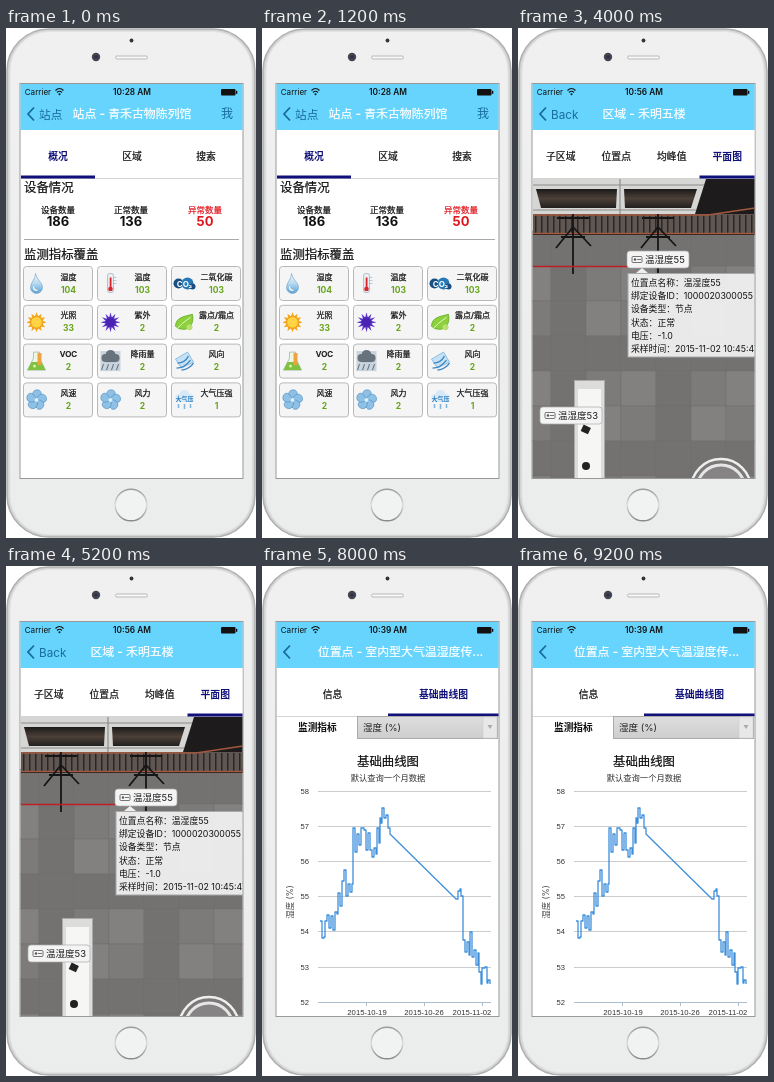
Write an HTML page that moves like this. It is 250x510 px and loops after 10000 ms.

```html
<!DOCTYPE html>
<html lang="zh-CN">
<head>
<meta charset="utf-8">
<style>
html, body { margin: 0; width: 100%; height: 100%; overflow: hidden; background: #fff }
svg { display: block; width: 250px; height: 510px }
text { font-family: Inter, "Noto Sans CJK SC", "Noto Sans CJK", sans-serif; fill: currentColor; white-space: pre }
.medium { font-weight: 500; stroke: currentColor; stroke-width: .22px }
.axis { font-family: "Liberation Sans", sans-serif }
</style>
</head>
<body>
<svg id="stage" viewBox="0 0 250 510"></svg>
<script>
const NAVY = '#10107a', INK = '#111', GREY = '#666', BLUE = '#4a9be8', SKY = '#67d4fd', LINK = '#176c9e', GREEN = '#65a31c';

const text = (x, y, s, size, fill = INK, anchor = 'middle', extra = '') =>
  `<text x="${x}" y="${y}" font-size="${size}" color="${fill}" text-anchor="${anchor}" ${extra}>${s}</text>`;
const rect = (x, y, w, h, fill, extra = '') =>
  `<rect x="${x}" y="${y}" width="${w}" height="${h}" fill="${fill}" ${extra}/>`;
const path = (d, stroke, width = 1, fill = 'none', extra = '') =>
  `<path d="${d}" stroke="${stroke}" stroke-width="${width}" fill="${fill}" ${extra}/>`;
const shape = (d, fill) => path(d, 'none', 0, fill);
const circle = (x, y, r, fill, extra = '') => `<circle cx="${x}" cy="${y}" r="${r}" fill="${fill}" ${extra}/>`;
const at = (x, y, s) => `<g transform="translate(${x} ${y})">${s}</g>`;
const spin = (n, s) => Array.from({ length: n }, (_, i) => `<g transform="rotate(${i * 360 / n})">${s}</g>`).join('');
const BOLD = 'font-weight="700"', SEMI = 'font-weight="600"', MED = 'class="medium"', AXIS = 'class="axis"';

// Weather and sensor icons, centred on the origin
const cloud = (fill, y = 0) => at(0, y, circle(-5, 0, 4, fill) + circle(0, -3, 5, fill) + circle(5, 0, 4, fill) + rect(-5, 0, 10, 4, fill));
const fan = spin(5, path('M0 0C-6-3-5-11 2-10C7-8 4-3 0 0Z', '#4c8fc4', .6, '#8fc0e6')) + circle(0, 0, 2, '#d9edfb');
const icon = {
  drop: path('M-1-10C0-4 6-1 6 4A6 6 0 0 1-6 4C-6-1-1-4-1-10Z', '#7aa9cd', .7, 'url(#water)') + path('M-3 3Q-3 7 1 7', '#fff', 1.2),
  heat: rect(-3, -10, 6, 19, '#e9eef2', 'rx="2" stroke="#9ab" stroke-width=".7"') + rect(-.8, -6, 1.8, 10, '#d8232a') +
    circle(0, 5.5, 2.3, '#d8232a') + path('M3-6h3M3-3h3M3 0h3', '#9ab', .6),
  co2: circle(-6, 0, 5, '#174f80') + circle(3, 0, 6, '#2779b5') + circle(8, 3, 3, '#174f80') +
    text(0, 3, 'CO₂', 8, '#fff', 'middle', BOLD),
  sun: spin(12, shape('M-2-5L0-10L2-5Z', '#f2a51d')) + circle(0, 0, 5.8, '#ffd342', 'stroke="#ef9c18"'),
  uv: spin(12, shape('M-1.5-4L0-10L1.5-4Z', '#5a35c8')) + circle(0, 0, 5, '#4a22b4'),
  leaf: path('M-9 4C-9-5 0-6 8-8C10 1 5 8-2 7Q-6 7-9 4Z', '#58a51c', .7, '#8cd03c') + path('M-9 8Q-3 1 6-5', '#e4f7bd', 1) +
    circle(5, 5, 3, '#b7df72'),
  flask: path('M-3-9h6v6L9 9h-18L-3-3Z', '#9bbaa0', .8, '#eef6e8') + shape('M-5 1h10L9 9h-18Z', '#7fc243') +
    rect(1, -8, 4, 12, '#f0a23c') + circle(-2, 5, 1.5, '#d9f2a8'),
  rain: rect(-10, -10, 20, 20, '#c9d3db') + cloud('#68727c', -3) + path('M-7 3l-2 6M-2 3l-2 6M3 3l-2 6M8 3l-2 6', '#48627a', .9),
  wind: path('M-9-2L3-9L9 1L-3 7Z', '#6fa8d5', .7, '#c4e2f6') + path('M-8 7Q0 7 6-1M-7 2Q0 2 4-5M-3 9Q5 8 9 2', '#3e86c2', 1.3),
  fan,
  press: cloud('#d5e9f7', -2) + text(0, 1, '大气压', 6, '#2f7fbd', 'middle', BOLD) + path('M-6 4v4M0 4v5M6 4v4', '#7db6df', 1.6)
};

function card(x, y, name, label, value, small) {
  return rect(x, y, 69, 34, '#f5f5f5', 'rx="3" stroke="#b8b8b8"') + at(x + 13, y + 17, icon[name]) +
    text(x + 45, y + 13, label, 8, INK, 'middle', MED) +
    (small ? text(x + 45, y + 25, value, 7.6, INK, 'middle', SEMI) : text(x + 45, y + 26, value, 8.5, GREEN, 'middle', BOLD));
}

const rule = y => path(`M18 ${y}H233`, '#aaa');
const heading = (y, s) => text(18, y, s, 12.4, INK, 'start', MED);

function header(time, back, title) {
  return rect(14, 55, 223, 47, SKY) + text(18.7, 67, 'Carrier', 8.1, INK, 'start') +
    path('M49.5 62.5Q53.5 58.5 57.5 62.5M51 64.5Q53.5 62 56 64.5', INK, 1.1) + circle(53.5, 66.3, 1, INK) +
    text(126, 67, time, 8.3, INK, 'middle', SEMI) +
    rect(215, 61, 14.5, 6.5, INK, 'rx="1"') + rect(230, 62.8, 1.3, 3, INK) +
    path('M28 79.5L22 86L28 92.5', LINK, 1.8) + text(33, 90.5, back, 11.7, LINK, 'start') +
    text(back ? 126 : 138.5, 90, title, 11.9, '#fff', 'middle', MED);
}

function tabs(names, active) {
  const w = 222 / names.length;
  return path('M15 150.5H237', '#d4d4d4') + names.map((s, i) =>
    text(15 + w * (i + .5), 132, s, 9.8, i == active ? NAVY : INK, 'middle', i == active ? BOLD : MED)).join('') +
    rect(15 + w * active, 147.5, w, 3, NAVY);
}

function picker(y) {
  return text(36, y + 15, '监测指标', 9.7, INK, 'start', BOLD) + rect(95.5, y + .5, 140, 22, 'url(#button)', 'stroke="#aaa"') +
    text(101, y + 15, '湿度 (%)', 9.5, '#222', 'start') + rect(221, y + 1, 14, 21, '#e8e8e8', 'stroke="#ccc" stroke-width=".6"') +
    shape(`M225.5 ${y + 9}h5l-2.5 4Z`, '#aaa');
}

function axes(title, y, top, high, low, step, gap) {
  let s = text(126, y, title, 12.4, INK, 'middle', MED) + text(126, y + 15, '默认查询一个月数据', 8.3, '#333') +
    text(0, 0, '湿度 (%)', 8.4, '#444', 'middle', 'transform="translate(31 336) rotate(-90)"');
  for (let v = high, i = 0; v >= low; v -= step, i++) {
    const gy = Math.round(top + i * gap) + .5;
    s += path(`M56 ${gy}H229`, v == low ? '#aebdcc' : '#ccc') + text(47, gy + 2.5, v, 7.6, '#333', 'end', AXIS);
  }
  return s;
}

function overview() {
  const stat = (x, label, n, fill) => text(x, 184.5, label, 8.5, fill, 'middle', MED) + text(x, 198, n, 13, fill, 'middle', BOLD);
  const items = [['drop', '湿度', 104], ['heat', '温度', 103], ['co2', '二氧化碳', 103], ['sun', '光照', 33], ['uv', '紫外', 2],
    ['leaf', '露点/霜点', 2], ['flask', 'VOC', 2], ['rain', '降雨量', 2], ['wind', '风向', 2], ['fan', '风速', 2], ['fan', '风力', 2], ['press', '大气压强', 1]];
  return header('10:28 AM', '站点', '站点 - 青禾古物陈列馆') + text(221, 90, '我', 12, LINK) +
    tabs(['概况', '区域', '搜索'], 0) + heading(164, '设备情况') +
    stat(52, '设备数量', 186, INK) + stat(125, '正常数量', 136, INK) + stat(199, '异常数量', 50, '#e0161c') +
    rule(211.5) + heading(231, '监测指标覆盖') +
    items.map((a, i) => card(17.5 + i % 3 * 74, 238.5 + Math.floor(i / 3) * 38.8, ...a)).join('');
}

const areaTabs = i => tabs(['子区域', '位置点', '均峰值', '平面图'], i);

function peaks() {
  const xs = [58, 67, 75, 84, 92, 101, 109, 117, 193, 202, 210, 219, 227];
  const mean = [341, 332, 322, 317, 306, 303, 313, 300, 326, 348, 343, 347, 349];
  const high = [314, 299, 288, 276, 243, 242, 280, 252, 285, 306, 307, 312, 310];
  const low = [380, 371, 350, 345, 332, 331, 334, 323, 356, 403, 370, 376, 367];
  const join = ys => xs.map((x, i) => [x, ys[i]]);
  return header('10:29 AM', 'Back', '区域 - 第一展厅') + areaTabs(2) + picker(157) + axes('均峰值', 207, 232, 70, 30, 10, 52.8) +
    path('M106.5 443v7M164.5 443v7M223.5 443v7', '#aebdcc') +
    path('M' + [...join(high), ...join(low).reverse()].join('L') + 'Z', 'none', 0, '#7cb5ec', 'opacity=".32"') +
    path('M' + join(mean).join('L'), BLUE, 1.3) + join(mean).map(p => circle(...p, 2.7, BLUE)).join('');
}

function tag(x, y, s) {
  return rect(x, y, 62, 17, '#f4f4f4', 'rx="3" stroke="#aaa" stroke-width=".7"') +
    rect(x + 5, y + 5.5, 10, 6, 'none', 'rx="1" stroke="#555" stroke-width=".8"') + circle(x + 8, y + 8.5, 1.2, '#555') +
    path(`M${x + 10} ${y + 8.5}h4`, '#555', .8) + text(x + 18, y + 12.2, s, 9.5, '#222', 'start');
}

function plan() {
  let s = '';
  for (let r = 0; r < 8; r++) for (let c = 0; c < 7; c++)
    s += rect(15 + c * 35 - 17, 203 + r * 35, 35, 35, ['#747271', '#7c7b79', '#838180'][(r * 2 + c * 3 + r * c) % 3], 'stroke="#706f6e" stroke-width=".6"');
  // Railing behind the display case
  s += rect(15, 150, 222, 57, '#1d1b1b') + rect(15, 186, 222, 20, '#5f5651');
  for (let x = 17; x < 237; x += 6) s += rect(x, 187, 1.5, 19, '#2c2624');
  s += path('M15 187H190L237 180M15 205.5H237', '#a4583f', 1.6);
  s += shape('M15 151H188L177 186H15Z', '#d6d6d4') + path('M15 157H186M15 182H178M102 151V186', '#8d8d8b', 1.2) +
    shape('M18 161H99L98 180H23Z', 'url(#scene)') + shape('M106 161H179L173 180H107Z', 'url(#scene)');
  for (const x of [55, 140])
    s += path(`M${x - 16} 190H${x + 16}M${x} 186V246M${x} 199L${x - 17} 220M${x} 199L${x + 18} 218M${x - 12} 209H${x + 12}`, '#151515', 1.8);
  s += path('M15 238.5H111', '#bd2024', 1.4) + rect(56.5, 352.5, 30, 98, '#dcdcdb', 'stroke="#aaa"') + rect(60, 361, 23, 90, '#f6f6f5') +
    rect(64, 398, 8, 7, '#222', 'transform="rotate(25 68 401)"') + circle(68, 438, 4, '#222') +
    circle(203, 461, 30, '#7b7978', 'stroke="#eee" stroke-width="2.5"') + circle(203, 461, 24, '#858383', 'stroke="#e6e6e6" stroke-width="3"') +
    tag(109, 223, '温湿度55') + tag(22, 379, '温湿度53') +
    rect(110, 245.5, 130, 83.5, '#f1f1f1', 'opacity=".94" stroke="#aaa"') + shape('M118 245l6-5l6 5Z', '#eee');
  const info = ['位置点名称：温湿度55', '绑定设备ID：1000020300055', '设备类型：节点', '状态：正常', '电压：-1.0', '采样时间：2015-11-02 10:45:47'];
  s += info.map((line, i) => text(113, 258 + i * 13.2, line, 8.8, INK, 'start')).join('');
  return s + header('10:56 AM', 'Back', '区域 - 禾明五楼') + rect(15, 102, 222, 48, '#fff') + areaTabs(3);
}

const pointHead = (time, i) => header(time, '', '位置点 - 室内型大气温湿度传...') + tabs(['信息', '基础曲线图'], i);

function details() {
  const row = (y, label, value) => text(81, y, label, 9.4, GREY, 'end') + text(88, y, value, 9.4, INK, 'start', MED);
  const rows = [['位置点名称', '室内型大气温湿度传感器450120'], ['绑定设备ID', '6101130145120'], ['产品序列号', 0], ['状态', '正常'],
    ['工作周期', '1200秒'], ['电压', '无电压'], ['设备类型', '节点'], ['信号强度', -60], ['链路质量', 12]];
  return pointHead('10:40 AM', 0) + heading(164, '实时数据') + row(182, '最后采样时间', '2015-11-02 18:23:12') +
    card(17.5, 190.5, 'drop', '湿度', '52.6 %', 1) + card(91.5, 190.5, 'heat', '温度', '20.8 ℃', 1) + card(165.5, 190.5, 'leaf', '露点/霜点', '10.7 ℃', 1) +
    rule(231.5) + heading(248, '基本信息') + rows.map((r, i) => row(268 + i * 17.9, ...r)).join('');
}

function curve() {
  // Each reading holds until the next one
  const steps = s => s.split(' ').map(p => 'H' + p.replace(',', 'V')).join('');
  const before = steps('60,372 62,371 63,355 65,349 67,362 69,350 71,364 73,346 75,348 76,327 78,340 80,315 82,304 84,330 86,318 88,326 90,318 91,262 ' +
    '93,286 95,268 97,279 99,262 102,264 104,284 106,267 108,284 110,291 112,282 114,288 115,262 117,277 118,252 119,257 120,242 122,252 124,249 126,262 128,268');
  const after = steps('196,325 198,323 199,330 201,374 203,386 205,376 207,389 208,366 210,391 212,384 214,399 216,387 217,406 219,418 220,402 223,401 225,417 226,414 228,418');
  return pointHead('10:39 AM', 1) + picker(150) + axes('基础曲线图', 199.5, 225, 58, 52, 1, 35.1) +
    path('M104.5 436v4M162.5 436v4M220.5 436v4', '#aebdcc') +
    ['2015-10-19', '2015-10-26', '2015-11-02'].map((s, i) => text([105, 162, 210][i], 449, s, 7.7, '#333', 'middle', AXIS)).join('') +
    path('M58 355' + before + 'L194 333' + after, '#3d8fdb', 1.3, 'none', 'stroke-linejoin="round"');
}

const gradient = (id, ...stops) => `<linearGradient id="${id}" x2="0" y2="1">` +
  stops.map((c, i) => `<stop offset="${i / (stops.length - 1)}" stop-color="${c}"/>`).join('') + '</linearGradient>';

const stage = document.getElementById('stage');
stage.innerHTML = '<defs>' + gradient('water', '#f3faff', '#b6d9f1', '#5c9fd2') + gradient('button', '#dedede', '#cdcdcd') +
  gradient('scene', '#1b1a19', '#4c4038', '#22201f') + gradient('body', '#f0f0f0', '#ebecec') + gradient('ring', '#999', '#ddd', '#888') +
  '<clipPath id="screen"><rect x="14.5" y="56" width="222" height="394"/></clipPath></defs>' +
  rect(1, 1, 248, 508, '#d3d4d4', 'rx="42" stroke="#b0b0b0" stroke-width="1.6"') +
  rect(4, 3.5, 242, 503, 'url(#body)', 'rx="39" stroke="#e4e4e4"') +
  circle(125.5, 12.5, 1.9, '#333') + circle(90, 29, 4.2, '#45454d') + circle(90, 29, 1.8, '#2a3050') +
  rect(109.5, 28, 32, 3, '#f8f8f8', 'rx="1.5" stroke="#aaa" stroke-width=".8"') +
  circle(125, 477, 15.8, '#f1f2f2', 'stroke="url(#ring)" stroke-width="1.5"') +
  rect(14, 55.5, 223, 395, '#fff', 'stroke="#999"') +
  '<g clip-path="url(#screen)">' + [overview, peaks, plan, details, curve].map(f => `<g class="page">${f()}</g>`).join('') + '</g>';

const pages = [...document.querySelectorAll('.page')];
const start = performance.now();
function draw(now) {
  const current = Math.floor(Math.max(0, now - start) % 10000 / 2000);
  pages.forEach((p, i) => p.style.display = i == current ? '' : 'none');
  requestAnimationFrame(draw);
}
draw(start);
</script>
</body>
</html>
```
